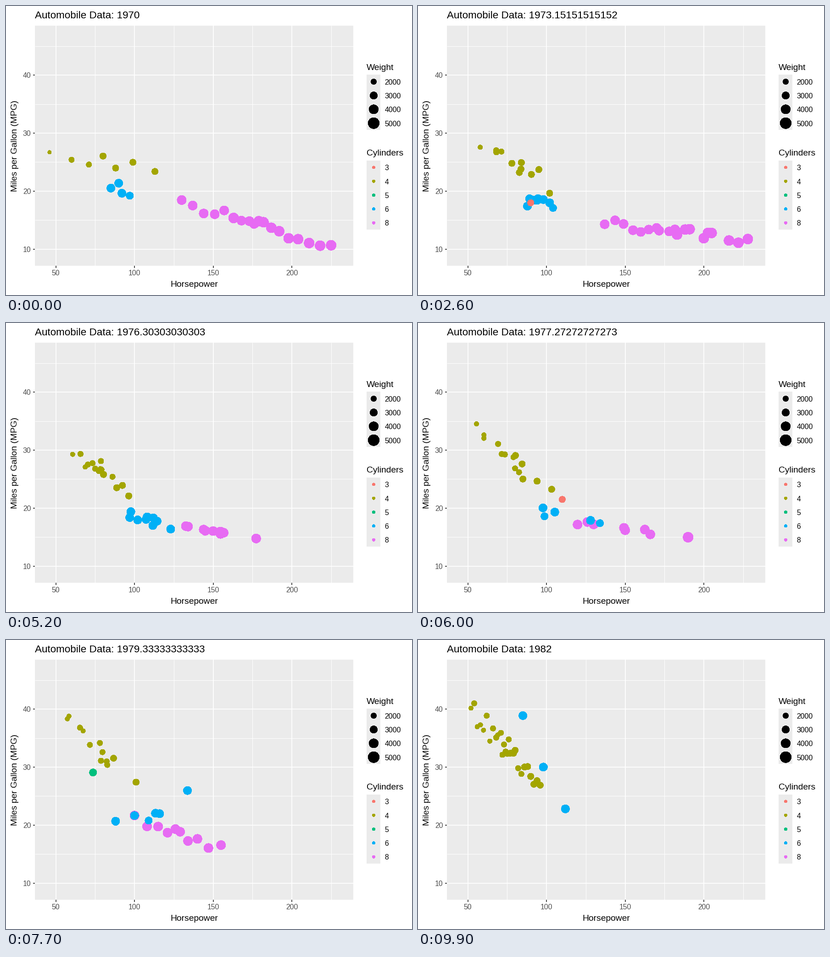
Recreate the animation shown at these times as a matplotlib script. Size 885 by 632 pixels, loop 10 s.

```python
import matplotlib.pyplot as plt
import numpy as np
from matplotlib.animation import FuncAnimation
from matplotlib.patches import Rectangle

plt.rcParams["font.family"] = "Liberation Sans"

W, H, DPI = 885, 632, 100
FRAMES, SPAN = 100, 12
PX = 72 / DPI                              # points per pixel
LEFT, TOP, RIGHT, BOTTOM = 63.4, 43.4, 757.4, 568.4
COLORS = {3: "#F8766D", 4: "#A3A500", 5: "#00BF7D", 6: "#00B0F6", 8: "#E76BF3"}
STACK = (8, 6, 5, 3, 4)                    # drawing order, bottom to top

# Cars per model year, 1970 to 1982
COUNTS = {
    8: [18, 7, 13, 20, 5, 6, 9, 8, 6, 10, 0, 1, 0],
    6: [4, 8, 0, 8, 6, 12, 10, 5, 12, 6, 2, 7, 3],
    4: [7, 12, 14, 11, 15, 12, 15, 14, 17, 12, 23, 20, 27],
}
# Key points of each cloud: year, lowest hp, highest hp, mpg at either end
TRENDS = {
    8: [(0, 130, 225, 18, 10.5), (3, 137, 228, 14.5, 11.5), (4, 140, 155, 15, 14),
        (7, 112, 190, 17.5, 15.5), (9, 100, 155, 21, 16), (11, 105, 105, 26.6, 26.6)],
    6: [(0, 85, 97, 21.5, 19), (4, 85, 108, 17.5, 17), (8, 85, 150, 20.5, 16.5),
        (10, 90, 125, 19.5, 32), (12, 85, 112, 38, 22)],
    4: [(0, 46, 113, 26, 25), (2, 58, 105, 27, 21), (6, 54, 102, 31, 21),
        (10, 48, 105, 43, 26), (12, 52, 96, 40, 27)],
}
# Rare engines, one car at a time: year, hp, mpg
RARE = {
    3: [(2, 97, 19), (3, 90, 18), (7, 110, 21.5), (10, 100, 23.7)],
    5: [(8, 103, 20.3), (9, 77, 25.4), (10, 67, 36.4)],
}
# Weight as base + slope * hp, its spread, and the spread of mpg
BUILD = {3: (2350, 0, 0, 0), 4: (1100, 14, 130, 2), 5: (2950, 0, 0, 0),
         6: (3200, 0, 220, 1.1), 8: (2600, 9.5, 200, 0.8)}


def px_x(hp):
    return LEFT + (hp - 36.8) / 202.4 * (RIGHT - LEFT)


def px_y(mpg):
    return BOTTOM - (mpg - 7.12) / 41.36 * (BOTTOM - TOP)


def point_size(weight):
    share = (np.asarray(weight, float) - 1613) / 3527
    return 1 + 5 * np.sqrt(np.clip(share, 0, 1))


def marker_area(size):
    radius = np.round(0.375 * 1.755 * (2.845 * size + 0.945))
    return (2 * radius * PX) ** 2


def cloud(cyl, t, rng):
    """Cars of one class in year t as rows of hp, mpg and point size."""
    base, slope, weight_spread, mpg_spread = BUILD[cyl]
    if cyl in RARE:
        spots = [(hp, mpg) for when, hp, mpg in RARE[cyl] if when == t]
        hp, mpg = np.array(spots, float).reshape(-1, 2).T
    else:
        n = COUNTS[cyl][t]
        knots = np.array(TRENDS[cyl], float).T
        lo, hi, mpg_lo, mpg_hi = (np.interp(t, knots[0], k) for k in knots[1:])
        u = np.linspace(-1, 1, n)
        u = 0.5 + 0.5 * np.sign(u) * np.abs(u) ** 1.3
        u = rng.permutation(u)
        hp = np.round(lo + (hi - lo) * u)
        mpg = mpg_lo + (mpg_hi - mpg_lo) * u + mpg_spread * rng.uniform(-1, 1, n)
    weight = base + slope * hp + weight_spread * rng.uniform(-1, 1, len(hp))
    return np.column_stack([hp, mpg, point_size(weight)])


rng = np.random.default_rng(7)
years = [{c: cloud(c, t, rng) for c in STACK} for t in range(SPAN + 1)]
marks = np.rint(np.arange(SPAN + 1) * (FRAMES - 1) / SPAN + 1).astype(int) - 1

fig = plt.figure(figsize=(W / DPI, H / DPI), dpi=DPI, facecolor="white")
ax = fig.add_axes([0, 0, 1, 1])
ax.set(xlim=(0, W), ylim=(H, 0))
ax.axis("off")


def box(x0, y0, x1, y1):
    ax.add_patch(Rectangle((x0, y0), x1 - x0, y1 - y0, fc="#EBEBEB", lw=0, zorder=0))


def line(xs, ys, color, width):
    ax.plot(xs, ys, color=color, lw=width * PX, solid_capstyle="butt", zorder=1)


def label(x, y, text, size, color="black", **kw):
    return ax.text(x, y, text, fontsize=size * PX, color=color, va="baseline", **kw)


box(LEFT, TOP, RIGHT, BOTTOM)
for hp in range(75, 226, 50):
    line([px_x(hp)] * 2, [TOP, BOTTOM], "white", 1)
for mpg in range(15, 46, 10):
    line([LEFT, RIGHT], [px_y(mpg)] * 2, "white", 1)
for hp in range(50, 201, 50):
    x = px_x(hp)
    line([x, x], [TOP, BOTTOM], "white", 1.7)
    line([x, x], [BOTTOM, BOTTOM + 4.8], "#333333", 1.7)
    label(x, 589, str(hp), 15.7, "#4D4D4D", ha="center")
for mpg in range(10, 41, 10):
    y = px_y(mpg)
    line([LEFT, RIGHT], [y, y], "white", 1.7)
    line([LEFT - 4.8, LEFT], [y, y], "#333333", 1.7)
    label(54.5, y + 6, str(mpg), 15.7, "#4D4D4D", ha="right")

label(410.5, 614, "Horsepower", 19.3, ha="center")
label(24.3, 306.5, "Miles per Gallon (MPG)", 19.2, ha="center",
      rotation=90, rotation_mode="anchor")
title = label(62.8, 27, "", 22.4)

KEY = 30.3


def legend(top, heading, names, sizes, colors):
    label(786, top - 10.5, heading, 19.3)
    box(786, top, 816, top + KEY * len(names))
    ys = top + KEY * (np.arange(len(names)) + 0.5)
    ax.scatter([801.5] * len(names), ys, s=marker_area(sizes), c=colors, lw=0,
               antialiased=False, zorder=3)
    for y, name in zip(ys, names):
        label(825.5, y + 6.3, str(name), 15.7)


steps = [2000, 3000, 4000, 5000]
legend(150.2, "Weight", steps, point_size(steps), ["black"] * 4)
legend(337.8, "Cylinders", list(COLORS), np.full(5, 1.5), list(COLORS.values()))

dots = ax.scatter([], [], lw=0, antialiased=False, zorder=3)


def blend(a, b, p):
    """Pair rows by order; unpaired rows hold still until the next year."""
    rows = a.copy()
    n = min(len(a), len(b))
    rows[:n] += (b[:n] - a[:n]) * p
    return rows


def draw(i):
    k = np.searchsorted(marks, i, side="right") - 1
    nxt = min(k + 1, SPAN)
    p = (i - marks[k]) / max(marks[nxt] - marks[k], 1)
    groups = [blend(years[k][c], years[nxt][c], p) for c in STACK]
    hp, mpg, size = np.vstack(groups).T
    dots.set_offsets(np.column_stack([px_x(hp), px_y(mpg)]))
    dots.set_sizes(marker_area(size))
    dots.set_facecolor([COLORS[c] for c, g in zip(STACK, groups) for _ in g])
    now = 1970 + SPAN * i / (FRAMES - 1)
    title.set_text(f"Automobile Data: {now:.15g}")
    return dots, title


anim = FuncAnimation(fig, draw, frames=FRAMES, interval=100, repeat=True, repeat_delay=0)
plt.show()
```
